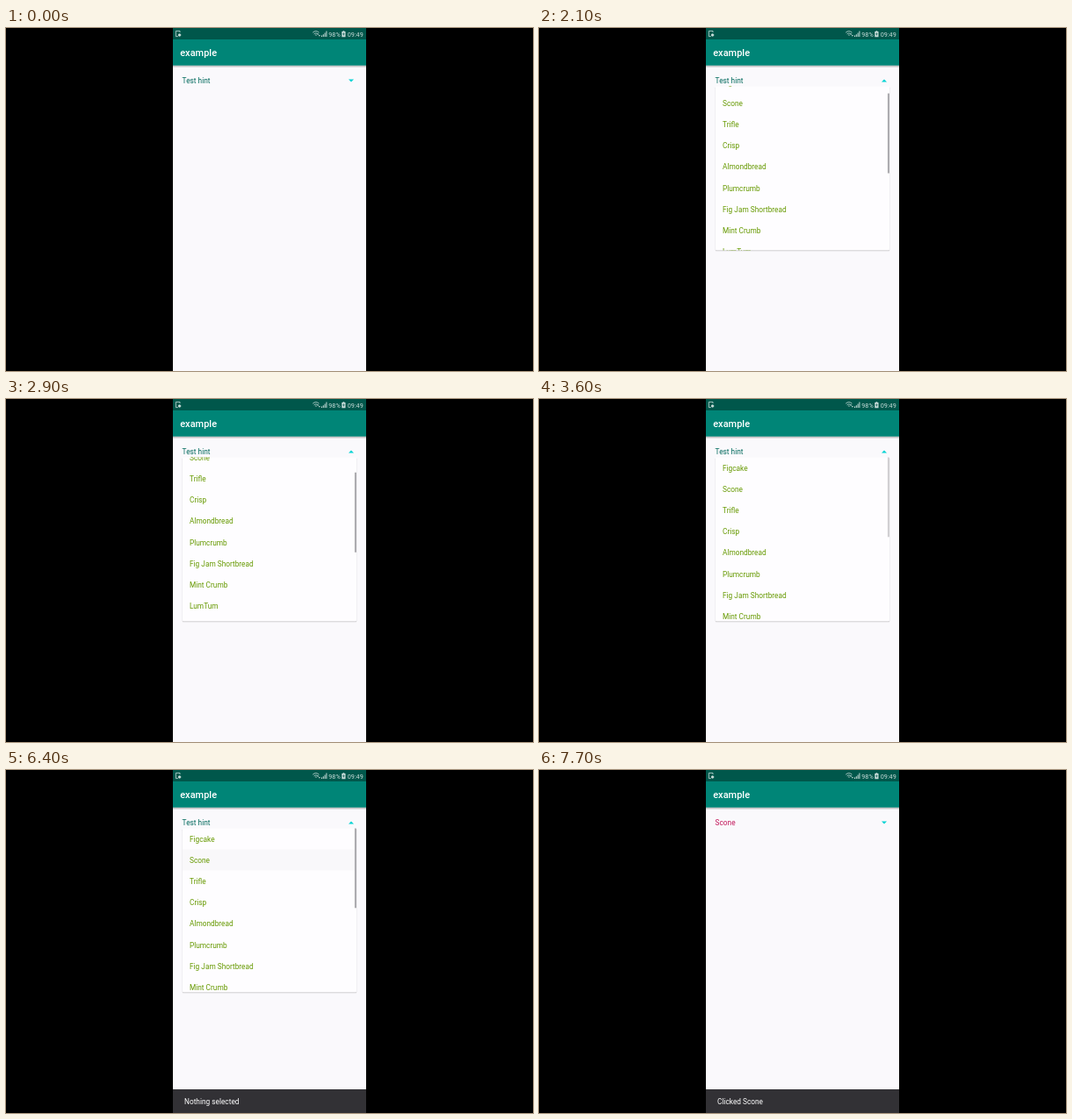
Recreate the animation shown at these times as an HTML page. Size 600 by 391 pixels, loop 8000 ms.

```html
<!DOCTYPE html>
<html lang="en">
<head>
<meta charset="utf-8">
<title>Spinner demo</title>
<style>
  html, body { margin: 0; width: 100%; height: 100%; overflow: hidden; background: #000; }
  svg { display: block; width: 100vw; height: 100vh; }
  text { font: 8.3px Roboto, "Noto Sans", sans-serif; }
  .title { font-size: 11px; font-weight: 500; fill: #fff; }
  .status text { font-size: 7.2px; fill: #c9dcd9; }
  #rows text { fill: #669900; }
</style>
</head>
<body>
<svg viewBox="0 0 600 391" xmlns="http://www.w3.org/2000/svg">
  <defs>
    <clipPath id="screen"><rect x="190" width="220" height="391"/></clipPath>
    <clipPath id="list"><rect x="201" y="66.3" width="198" height="187.2" rx="1"/></clipPath>
    <linearGradient id="shade" x2="0" y2="1">
      <stop stop-color="#000" stop-opacity=".32"/>
      <stop offset="1" stop-color="#000" stop-opacity="0"/>
    </linearGradient>
  </defs>
  <rect width="600" height="391"/>
  <g clip-path="url(#screen)">
    <rect x="190" width="220" height="391" fill="#faf9fc"/>
    <rect x="190" y="42.5" width="220" height="3" fill="url(#shade)"/>
    <rect x="190" y="13" width="220" height="29.7" fill="#008577"/>
    <rect x="190" width="220" height="13" fill="#00574b"/>
    <text class="title" x="198.2" y="32">example</text>

    <g class="status">
      <g fill="none" stroke="#c9dcd9" stroke-width=".8">
        <path d="M198 5V3.4h-4.6v6.2h2.4"/>
        <circle cx="197.6" cy="8" r="1.3" fill="#c9dcd9"/>
        <path d="M349.2 5.2q3.6-3.2 7.2 0M350.6 6.8q2.2-2 4.4 0M351.9 8.3q.9-.8 1.8 0"/>
      </g>
      <g fill="#c9dcd9">
        <path id="upload" d="M354.3 7.6l1-1.5 1 1.5z"/>
        <path id="download" d="M355.9 8.1h2l-1 1.6z"/>
        <path d="M359 10V8.6h1V10zM360.8 10V7.2h1V10zM362.6 10V5.4h1V10zM364.4 10V3.4h1V10z"/>
        <path d="M382.3 4h1.2V3.2h1.8V4h1.2v6.2h-4.2z"/>
      </g>
      <path d="M384.8 4.8l-1.6 2.5h1.1l-.4 2 1.7-2.7h-1.1z" fill="#00574b"/>
      <text x="367.3" y="9.7">98%</text>
      <text x="388.8" y="9.7">09:49</text>
    </g>

    <text id="label" x="200.6" y="62.5"></text>
    <path id="arrow" d="M-3-1.5H3L0 1.5z" fill="#00d3d3"/>

    <g id="popup">
      <rect x="200.6" y="66.8" width="198.8" height="187.8" rx="1.5" fill="#000" opacity=".1"/>
      <rect x="201" y="67" width="198" height="187.1" rx="1" fill="#000" opacity=".16"/>
      <rect x="201" y="66.3" width="198" height="187.2" rx="1" fill="#fefdff"/>
      <g clip-path="url(#list)">
        <rect id="press" x="201" y="90.4" width="198" height="24.1" fill="#000"/>
        <g id="rows"></g>
        <rect id="bar" x="396.9" width="2.3" height="91" fill="#adacb0"/>
      </g>
    </g>

    <g id="snack">
      <rect x="190" y="364" width="220" height="27" fill="#323135"/>
      <text id="message" x="203" y="381" fill="#fff"></text>
    </g>
  </g>
</svg>
<script>
const LOOP = 8000, STEP = 100, PITCH = 24.1, BAR_RATIO = 0.485;
const desserts = ["Figcake", "Scone", "Trifle", "Crisp", "Almondbread", "Plumcrumb",
  "Fig Jam Shortbread", "Mint Crumb", "LumTum", "Pearloaf", "Plum Pudding",
  "Fritter", "Tart", "Flan", "Custard", "Biscuit"];
const el = id => document.getElementById(id);
const set = (id, name, value) => el(id).setAttribute(name, value);

desserts.forEach((name, i) => {
  const row = document.createElementNS("http://www.w3.org/2000/svg", "text");
  row.setAttribute("x", 209);
  row.setAttribute("y", 82 + PITCH * i);
  row.textContent = name;
  el("rows").append(row);
});

// Linear interpolation through [time, value] pairs.
function track(t, keys) {
  const next = keys.findIndex(key => key[0] > t);
  if (next < 0) return keys[keys.length - 1][1];
  if (next === 0) return keys[0][1];
  const [t0, a] = keys[next - 1], [t1, b] = keys[next];
  return a + (b - a) * (t - t0) / (t1 - t0);
}

const scroll = [[2000, 0], [2100, 17], [2200, 58], [2300, 105], [2400, 145], [2500, 168],
  [2600, 166], [2700, 128], [2800, 78], [2900, 36], [3000, 14], [3100, 4], [3200, 0]];
const snackDrop = [[3700, 27], [3800, 21], [3900, 5], [4000, 0], [6600, 0], [6700, 10],
  [6800, 27], [6900, 18], [7000, 4], [7100, 0]];
const barFade = [[3400, 1], [3500, .9], [3600, .55], [3700, .1], [3800, 0], [5300, 0], [5400, 1]];
const press = [[6300, 0], [6400, .02], [6500, .07], [6600, .09]];

function draw(t) {
  const second = t >= 5000;
  const start = second ? 5400 : 1100, end = second ? 6700 : 3800;
  const turn = track(t, [[start - 100, 0], [start, 95], [start + 100, 160], [start + 200, 180],
    [end - 100, 180], [end, 140], [end + 100, 45], [end + 200, 0]]);
  const alpha = track(t, [[start - 100, 0], [start, .75], [start + 100, .97], [start + 200, 1],
    [end - 100, 1], [end, .45], [end + 100, 0]]);
  const scale = track(t, [[start, .973], [start + 100, .997], [start + 200, 1]]);
  const offset = track(t, scroll);
  const picked = t >= 6700;

  el("label").textContent = picked ? desserts[1] : "Test hint";
  set("label", "fill", picked ? "#c2185b" : "#00695c");
  set("arrow", "transform", `translate(393 60) rotate(${turn})`);
  set("popup", "opacity", alpha);
  set("popup", "transform", `translate(300 66.3) scale(${scale}) translate(-300 -66.3)`);
  set("rows", "transform", `translate(0 ${-offset})`);
  set("press", "opacity", track(t, press));
  set("bar", "y", 66.3 + offset * BAR_RATIO);
  set("bar", "opacity", track(t, barFade));
  set("snack", "transform", `translate(0 ${track(t, snackDrop)})`);
  el("message").textContent = t > 6800 ? "Clicked " + desserts[1] : "Nothing selected";
  set("message", "opacity", track(t, [[3800, 0], [4000, 1], [6600, 1], [6800, 0], [6900, 0], [7100, 1]]));
  const idle = t >= 7000 && t < 7700;
  set("upload", "opacity", idle ? .35 : 1);
}

function frame(now) {
  draw(Math.floor(now % LOOP / STEP) * STEP);
  requestAnimationFrame(frame);
}
draw(0);
requestAnimationFrame(frame);
</script>
</body>
</html>
```
